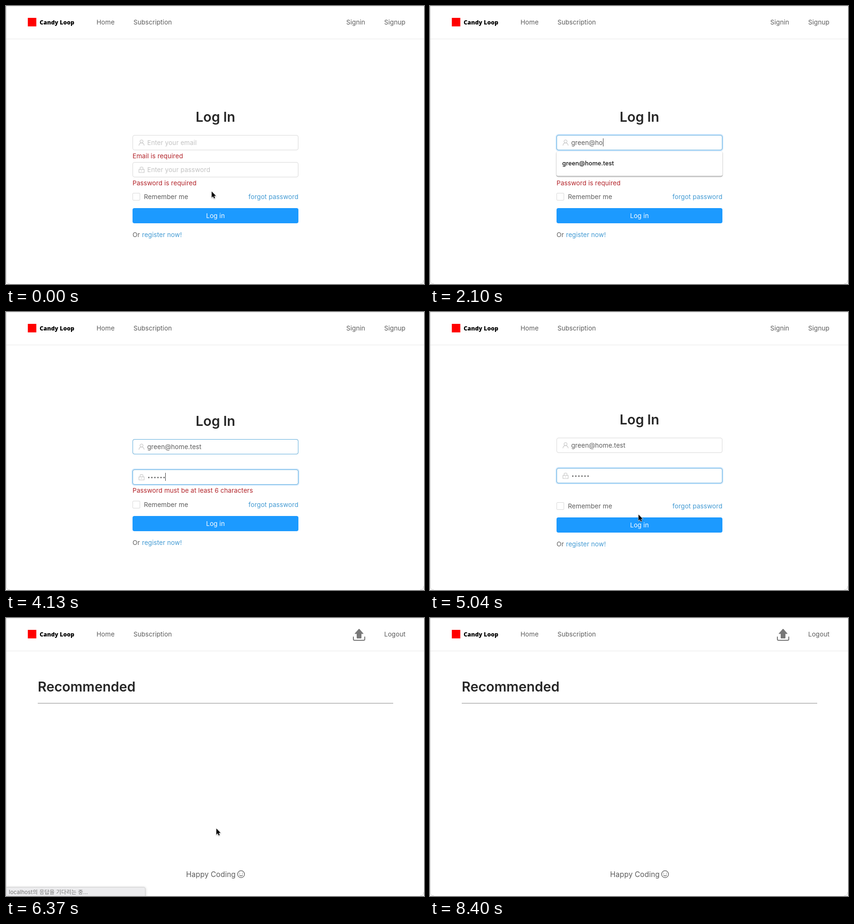
Animation, 882 px wide and 586 px high, one loop 8.47 s. Source, as an HTML page:

```html
<!DOCTYPE html>
<html lang="en">
<head>
<meta charset="utf-8">
<title>Log in</title>
<style>
  html, body { margin: 0; width: 100%; height: 100%; overflow: hidden; background: #fff; }
  svg { display: block; width: 100%; height: 100%; }
  text { font: 13.5px Inter, "Noto Sans CJK KR", sans-serif; letter-spacing: .07px; fill: #5c5c5c; white-space: pre; }
  .brand { font: 800 12.2px "Open Sans", sans-serif; fill: #000; }
  .title { font-size: 28.5px; font-weight: 600; letter-spacing: -.08px; fill: #262626; }
  .link { fill: #429ad3; }
  .error { fill: #b3242a; }
  .hint { fill: #c3c3c3; }
  .mid { text-anchor: middle; }
  .box { fill: #fff; stroke: #d9d9d9; }
  .edge { fill: none; stroke: #62aedd; }
  .glow { fill: none; stroke: #1890ff; stroke-opacity: .22; stroke-width: 2; }
  .icon { fill: none; stroke: #c3c3c3; stroke-width: 1.1; }
  .caret { fill: #444; }
</style>
</head>
<body>
<svg viewBox="0 0 882 586">
  <path d="M0 .5H882M0 69.5H882" stroke="#e8e8e8"/>
  <rect x="46" y="25" width="18" height="18" fill="#f00"/>
  <text class="brand" x="71" y="39">Candy Loop</text>
  <text x="191" y="39">Home</text>
  <text x="269" y="39">Subscription</text>

  <g id="login">
    <text x="718" y="39">Signin</text>
    <text x="798" y="39">Signup</text>
    <g id="email">
      <text class="title mid" x="442" y="244">Log In</text>
      <rect class="box" x="267.5" y="272.5" width="349" height="31" rx="3.5"/>
      <rect class="glow" x="266" y="271" width="352" height="34" rx="5"/>
      <rect class="edge" x="267.5" y="272.5" width="349" height="31" rx="3.5"/>
      <path class="icon" d="M280.5 294.2C280.8 290.5 283 288.6 286 288.6S291.2 290.5 291.5 294.2M289.2 285.4a3.2 3.2 0 1 1-6.4 0a3.2 3.2 0 1 1 6.4 0"/>
      <text class="hint" x="298" y="293">Enter your email</text>
      <text class="value" x="298" y="293"></text>
      <rect class="caret" y="279" width="1" height="17"/>
      <text class="error" x="267" y="321">Email is required</text>
    </g>
    <g id="password">
      <rect class="box" x="267.5" y="329.5" width="349" height="31" rx="3.5"/>
      <rect class="glow" x="266" y="328" width="352" height="34" rx="5"/>
      <rect class="edge" x="267.5" y="329.5" width="349" height="31" rx="3.5"/>
      <path class="icon" d="M280.5 344.5h11v6.5h-11zM283 344.5v-3q0-2 2-2h2q2 0 2 2v3M286 346.5v2"/>
      <text class="hint" x="298" y="350">Enter your password</text>
      <g class="value"></g>
      <rect class="caret" y="336" width="1" height="17"/>
      <text class="error" x="267" y="378"></text>
    </g>
    <g id="actions">
      <rect class="box" x="267.5" y="394.5" width="15" height="15" rx="1.5"/>
      <text x="291" y="407">Remember me</text>
      <text class="link" x="617" y="407" text-anchor="end">forgot password</text>
      <rect id="wave" fill="none" stroke="#1890ff"/>
      <g id="button">
        <rect x="267" y="426" width="350" height="32" rx="4" fill="#1c9aff"/>
        <text class="mid" x="442" y="447" style="fill:#fff">Log in</text>
      </g>
      <text x="267" y="487">Or</text>
      <text class="link" x="287" y="487">register now!</text>
    </g>
    <g id="suggestion">
      <rect x="267" y="307" width="350" height="51" rx="3" fill="#fff" style="filter:drop-shadow(0 1px 1px #0007)"/>
      <text x="279" y="336" style="font-size:12.7px;font-weight:500;fill:#111">green@home.test</text>
    </g>
  </g>

  <g id="landing">
    <path d="M745 23L754 33H749.5V42.5H740.5V33H736Z" fill="#787878" stroke="#787878" stroke-linejoin="round"/>
    <path d="M733 40V44.5Q733 47 735.5 47H754.5Q757 47 757 44.5V40" fill="none" stroke="#787878" stroke-width="2" stroke-linecap="round"/>
    <text x="798" y="39">Logout</text>
    <text class="title" x="67" y="155">Recommended</text>
    <path d="M67 179.5H817" stroke="#a2a2a2"/>
    <path d="M67 180.5H817" stroke="#e4e4e4"/>
    <text x="380" y="546" style="font-size:15.4px">Happy Coding</text>
    <g fill="none" stroke="#595959" stroke-width="1.3">
      <circle cx="496" cy="540" r="7.3"/>
      <path d="M493 541.2Q493.4 543.8 496 543.8T499 541.2" stroke-width="1.1"/>
      <path d="M493.3 537.3v1.4M498.7 537.3v1.4"/>
    </g>
  </g>

  <g id="status">
    <path d="M0 567.5H290Q294 567.5 294 572V587H0Z" fill="#ececee" stroke="#cfcfcf" style="filter:drop-shadow(1px 0 2px #0002)"/>
    <text x="6" y="582" style="font-size:11.6px;fill:#777">localhost의 응답을 기다리는 중...</text>
  </g>

  <path d="M.5 0V578Q.5 585.5 8 585.5M874 585.5Q881.5 585.5 881.5 578" fill="none" stroke="#cfcfcf"/>

  <g id="mouse">
    <path id="arrow" d="M0 0V12.8L3 10 4.9 14.6 7 13.7 5.1 9.2H9Z" stroke="#fff" stroke-width="1.2" paint-order="stroke" style="filter:drop-shadow(0 1px 1px #0005)"/>
    <path id="beam" d="M-3-8Q0-8 0-6V6Q0 8-3 8M3-8Q0-8 0-6M0 6Q0 8 3 8" fill="none" stroke="#333"/>
    <g id="denied" fill="#f2f2f2" stroke="#8a8f96" stroke-width="1.8">
      <circle cx="9" cy="20.5" r="9" fill="#fff" stroke="none"/>
      <circle cx="9" cy="20.5" r="7.4"/>
      <path d="M3.8 15.3L14.2 25.7"/>
    </g>
  </g>
</svg>
<script>
const LOOP = 8470;
const ADDRESS = 'green@home.test';
const EMAIL_KEYS = [1120, 1260, 1400, 1540, 1680, 1890, 2030, 2100];
const PASSWORD_KEYS = [3010, 3220, 3430, 3640, 3850, 4120];
const FOCUS_EMAIL = 770, AUTOFILL = 2310, FOCUS_PASSWORD = 2800;
const CLICK = 5600, LANDING = 6230, STATUS_END = 7210;
const FADE = 280;

// Pointer path: time, x, y
const PATH = [
  [70, 434, 391], [700, 425, 288], [4690, 425, 288], [5040, 440, 427],
  [5390, 443, 443], [6650, 444, 444], [6930, 444, 444], [7630, 640, -24]
];

const $ = id => document.getElementById(id);
const set = (el, attrs) => { for (const k in attrs) el.setAttribute(k, attrs[k]); };
const show = (el, on) => set(el, { visibility: on ? 'inherit' : 'hidden' });
const clamp = v => Math.min(1, Math.max(0, v));
const ease = p => p * p * (3 - 2 * p);
const ramp = (t, start, span) => ease(clamp((t - start) / span));
const pressed = (keys, t) => keys.filter(k => k <= t).length;

const field = id => {
  const part = name => $(id).querySelector('.' + name);
  return { group: $(id), glow: part('glow'), edge: part('edge'), hint: part('hint'),
           value: part('value'), caret: part('caret'), error: part('error') };
};
const email = field('email'), password = field('password');

password.value.innerHTML = PASSWORD_KEYS.map((_, i) =>
  `<circle cx="${301.3 + 6.45 * i}" cy="346" r="1.4" fill="#555"/>`).join('');

function pointer(t) {
  const i = PATH.findIndex(p => p[0] > t);
  if (i === 0) return PATH[0].slice(1);
  if (i < 0) return PATH[PATH.length - 1].slice(1);
  const [t0, x0, y0] = PATH[i - 1], [t1, x1, y1] = PATH[i];
  const p = ramp(t, t0, t1 - t0);
  return [x0 + (x1 - x0) * p, y0 + (y1 - y0) * p];
}

function drawField(f, t, { from, to, keys, empty, caretX, hover }) {
  const focus = ramp(t, from, 200) * (1 - ramp(t, to, 200));
  set(f.glow, { opacity: focus });
  set(f.edge, { opacity: hover ? 1 : focus });
  show(f.hint, empty);
  const last = Math.max(from, ...keys.filter(k => k <= t));
  show(f.caret, t >= from && t < to && (t - last) % 1000 < 500);
  set(f.caret, { x: Math.round(caretX) });
}

function render(t) {
  const emailDone = t >= AUTOFILL + FADE ? 1 : 0;
  const filled = PASSWORD_KEYS[5];
  const passwordDone = t >= filled + FADE - 60 ? 1 : 0;
  const done = emailDone + passwordDone;
  const offsets = [Math.floor(-3.5 * done), Math.floor(3.5 * (emailDone - passwordDone)), Math.ceil(3.5 * done)];
  [email.group, password.group, $('actions')].forEach((g, i) => set(g, { transform: `translate(0 ${offsets[i]})` }));

  const [mx, my] = pointer(t);
  const over = top => my >= top && my < top + 32;
  const overEmail = over(272 + offsets[0]), overPassword = over(329 + offsets[1]);

  const typed = t >= AUTOFILL ? ADDRESS : ADDRESS.slice(0, pressed(EMAIL_KEYS, t));
  email.value.textContent = typed;
  drawField(email, t, {
    from: FOCUS_EMAIL, to: FOCUS_PASSWORD, keys: [...EMAIL_KEYS, AUTOFILL], empty: !typed,
    caretX: 298 + (typed ? email.value.getComputedTextLength() : 0), hover: overEmail
  });
  set(email.error, { opacity: 1 - ramp(t, AUTOFILL, FADE) });

  const count = pressed(PASSWORD_KEYS, t);
  [...password.value.children].forEach((dot, i) => show(dot, i < count));
  drawField(password, t, {
    from: FOCUS_PASSWORD, to: CLICK, keys: PASSWORD_KEYS, empty: !count,
    caretX: 298 + 6.4 * count, hover: overPassword
  });
  password.error.textContent = count ? 'Password must be at least 6 characters' : 'Password is required';
  set(password.error, { opacity: 1 - ramp(t, filled, FADE - 60) });

  show($('suggestion'), t >= EMAIL_KEYS[0] && t < AUTOFILL);

  set($('button'), { opacity: 1 - .4 * ramp(t, CLICK, 180) });
  const spread = 6 * ramp(t, CLICK, 400);
  set($('wave'), {
    x: 267 - spread / 2, y: 426 - spread / 2, width: 350 + spread, height: 32 + spread, rx: 4 + spread / 2,
    'stroke-width': spread, opacity: .2 * (1 - clamp((t - CLICK) / 600))
  });

  const landed = t >= LANDING;
  set($('login'), { display: landed ? 'none' : 'inline' });
  set($('landing'), { display: landed ? 'inline' : 'none' });
  show($('status'), landed && t < STATUS_END);

  const beam = !landed && (overEmail || overPassword);
  show($('mouse'), t < EMAIL_KEYS[0] || t >= 4760);
  set($('mouse'), { transform: `translate(${mx} ${my})` });
  show($('arrow'), !beam);
  show($('beam'), beam);
  show($('denied'), t >= CLICK + 70 && !landed);
}

function tick() {
  render(performance.now() % LOOP);
  requestAnimationFrame(tick);
}
tick();
</script>
</body>
</html>
```
